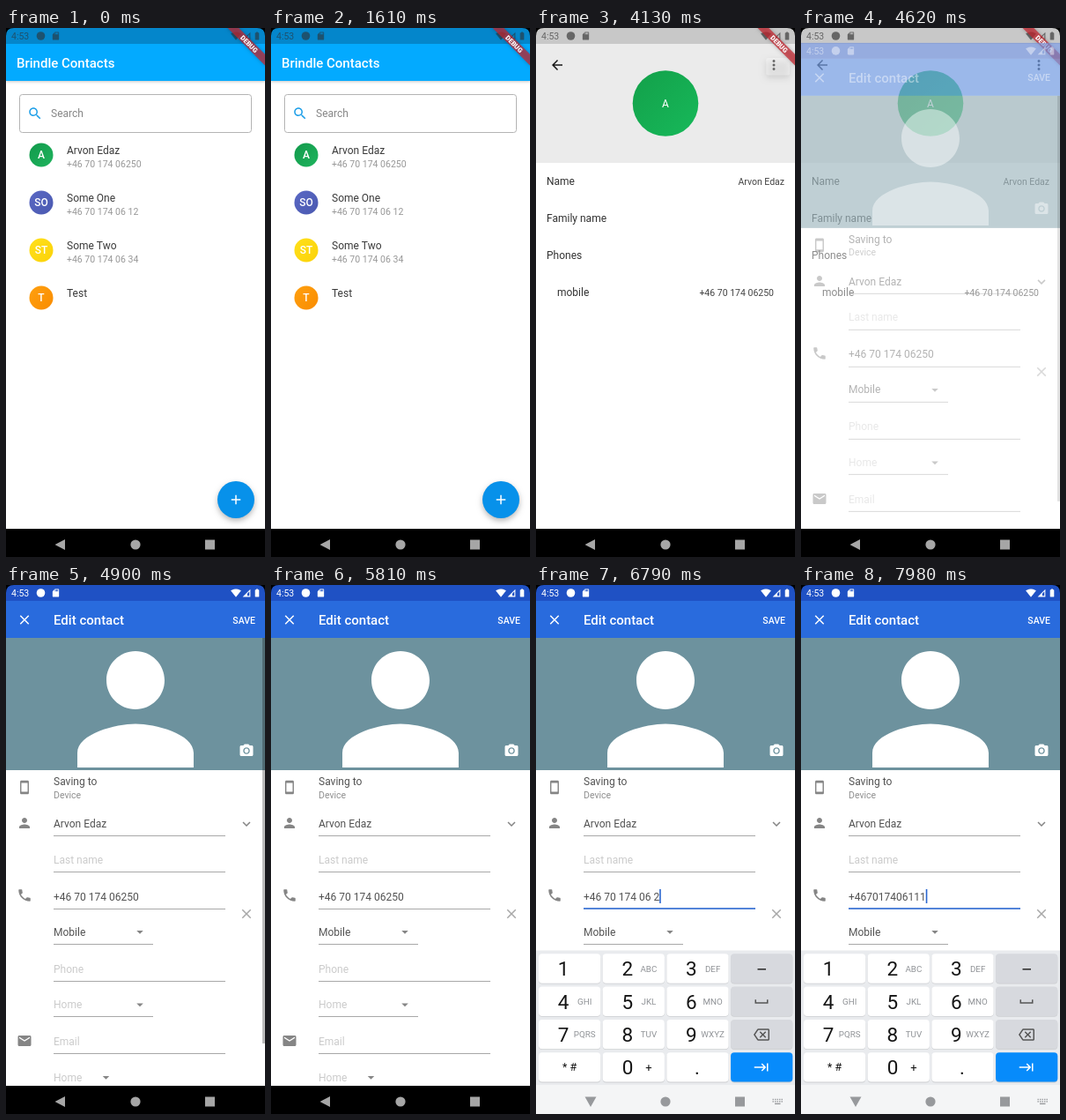
Recreate the animation shown at these times as an HTML page with a canvas. Size 294x600 px, loop 8 s.

```html
<!DOCTYPE html>
<html lang="en">
<head>
<meta charset="utf-8">
<title>Contacts</title>
<style>
html, body { margin: 0; width: 100%; height: 100%; overflow: hidden; background: #fff; }
canvas { display: block; width: 294px; height: 600px; }
</style>
</head>
<body>
<canvas id="stage"></canvas>
<script>
const W = 294, H = 600, LOOP = 8000, TICK = 70;
const canvas = document.getElementById('stage');
const ctx = canvas.getContext('2d');
const ratio = window.devicePixelRatio || 1;
canvas.width = W * ratio;
canvas.height = H * ratio;

const NAME = 'Arvon Edaz', PHONE = '+46 70 174 06250';
const CONTACTS = [
  { name: NAME, phone: PHONE, tag: 'A', from: '#12994b', to: '#1fb45e' },
  { name: 'Some One', phone: '+46 70 174 06 12', tag: 'SO', from: '#5a68c4', to: '#4a59b0' },
  { name: 'Some Two', phone: '+46 70 174 06 34', tag: 'ST', from: '#ffe01c', to: '#fbd208' },
  { name: 'Test', phone: '', tag: 'T', from: '#ffa010', to: '#f98c00' }
];

// Text in the phone field from each moment on
const TYPING = [
  [0, PHONE],
  [6650, '+46 70 174 06 25'],
  [6790, '+46 70 174 06 2'],
  [6930, '+46 70 174 06'],
  [7210, '+46 70 174 06 1'],
  [7420, '+46 70 174 06 11'],
  [7560, '+467017406111']
];
const DETAIL_AT = 1680, MENU_AT = 4095, MENU_TAP = 4480;
const EDIT_AT = 4560, FOCUS_AT = 5950, KEYS_AT = 6010;

const ICONS = {
  search: 'M15.5 14h-.79l-.28-.27C15.41 12.59 16 11.11 16 9.5 16 5.91 13.09 3 9.5 3S3 5.91 3 9.5 5.91 16 9.5 16c1.61 0 3.09-.59 4.23-1.57l.27.28v.79l5 4.99L20.49 19l-4.99-5zm-6 0C7.01 14 5 11.99 5 9.5S7.01 5 9.5 5 14 7.01 14 9.5 11.99 14 9.5 14z',
  add: 'M19 13h-6v6h-2v-6H5v-2h6V5h2v6h6v2z',
  back: 'M20 11H7.83l5.59-5.59L12 4l-8 8 8 8 1.41-1.41L7.83 13H20v-2z',
  close: 'M19 6.41L17.59 5 12 10.59 6.41 5 5 6.41 10.59 12 5 17.59 6.41 19 12 13.41 17.59 19 19 17.59 13.41 12z',
  more: 'M12 4a2 2 0 1 0 .01 0zM12 10a2 2 0 1 0 .01 0zM12 16a2 2 0 1 0 .01 0z',
  device: 'M17 1H7c-1.1 0-2 .9-2 2v18c0 1.1.9 2 2 2h10c1.1 0 2-.9 2-2V3c0-1.1-.9-2-2-2zM17 19H7V5h10v14z',
  person: 'M12 12c2.21 0 4-1.79 4-4s-1.79-4-4-4-4 1.79-4 4 1.79 4 4 4zm0 2c-2.67 0-8 1.34-8 4v2h16v-2c0-2.66-5.33-4-8-4z',
  phone: 'M6.62 10.79c1.44 2.83 3.76 5.14 6.59 6.59l2.2-2.2c.27-.27.67-.36 1.02-.24 1.12.37 2.33.57 3.57.57.55 0 1 .45 1 1V20c0 .55-.45 1-1 1-9.39 0-17-7.61-17-17 0-.55.45-1 1-1h3.5c.55 0 1 .45 1 1 0 1.25.2 2.45.57 3.57.11.35.03.74-.25 1.02l-2.2 2.2z',
  mail: 'M20 4H4c-1.1 0-2 .9-2 2v12c0 1.1.9 2 2 2h16c1.1 0 2-.9 2-2V6c0-1.1-.9-2-2-2zm0 4l-8 5-8-5V6l8 5 8-5v2z',
  camera: 'M9 2L7.17 4H4c-1.1 0-2 .9-2 2v12c0 1.1.9 2 2 2h16c1.1 0 2-.9 2-2V6c0-1.1-.9-2-2-2h-3.17L15 2H9zm3 15c-2.76 0-5-2.24-5-5s2.24-5 5-5 5 2.24 5 5-2.24 5-5 5zM12 8.8a3.2 3.2 0 1 0 .01 0z',
  expand: 'M16.59 8.59L12 13.17 7.41 8.59 6 10l6 6 6-6z',
  drop: 'M7 10l5 5 5-5z',
  erase: 'M22 3H7c-.69 0-1.23.35-1.59.88L0 12l5.41 8.11c.36.53.9.89 1.59.89h15c1.1 0 2-.9 2-2V5c0-1.1-.9-2-2-2zm0 16H7.07L2.4 12l4.66-7H22v14zm-11.59-2L14 13.41 17.59 17 19 15.59 15.41 12 19 8.41 17.59 7 14 10.59 10.41 7 9 8.41 12.59 12 9 15.59z',
  next: 'M11.59 7.41L15.17 11H1v2h14.17l-3.59 3.59L13 18l6-6-6-6-1.41 1.41zM20 6v12h2V6h-2z',
  space: 'M20 9v4H4V9H2v6h20V9z',
  card: 'M18 2h-8L4 8v12c0 1.1.9 2 2 2h12c1.1 0 2-.9 2-2V4c0-1.1-.9-2-2-2zm-6 6h-2V4h2v4zm3 0h-2V4h2v4zm3 0h-2V4h2v4z',
  wifi: 'M12 21.5L23.64 7c-.45-.34-4.93-4-11.64-4S.81 6.66.36 7z',
  signal: 'M22 2L2 22h20zM19.5 8v11.5H14V13.5z',
  battery: 'M15.67 4H14V2h-4v2H8.33C7.6 4 7 4.6 7 5.33v15.33C7 21.4 7.6 22 8.33 22h7.33c.74 0 1.34-.6 1.34-1.33V5.33C17 4.6 16.4 4 15.67 4z'
};
for (const key in ICONS) ICONS[key] = new Path2D(ICONS[key]);

const clamp = v => Math.max(0, Math.min(1, v));
const span = (t, from, length) => clamp((t - from) / length);
const easeOut = v => 1 - (1 - v) * (1 - v);

function rect(x, y, w, h, color) {
  ctx.fillStyle = color;
  ctx.fillRect(x, y, w, h);
}

function roundRect(x, y, w, h, r, color) {
  ctx.beginPath();
  ctx.roundRect(x, y, w, h, r);
  ctx.fillStyle = color;
  ctx.fill();
}

function disc(x, y, r, color) {
  ctx.beginPath();
  ctx.arc(x, y, r, 0, Math.PI * 2);
  ctx.fillStyle = color;
  ctx.fill();
}

function poly(color, ...points) {
  ctx.beginPath();
  points.forEach(([x, y]) => ctx.lineTo(x, y));
  ctx.fillStyle = color;
  ctx.fill();
}

function text(str, x, y, size, color, align = 'left', weight = 400) {
  ctx.font = `${weight} ${size}px Roboto, sans-serif`;
  ctx.textAlign = align;
  ctx.textBaseline = 'alphabetic';
  ctx.fillStyle = color;
  ctx.fillText(str, x, y);
}

function icon(name, x, y, color, size = 18) {
  ctx.save();
  ctx.translate(x - size / 2, y - size / 2);
  ctx.scale(size / 24, size / 24);
  ctx.fillStyle = color;
  ctx.fill(ICONS[name], 'evenodd');
  ctx.restore();
}

function shadow(color, blur, dy) {
  ctx.shadowColor = color;
  ctx.shadowBlur = blur * ratio;
  ctx.shadowOffsetY = dy * ratio;
}

function avatar(c, x, y, r) {
  const g = ctx.createLinearGradient(x - r, y - r, x + r, y + r);
  g.addColorStop(0, c.from);
  g.addColorStop(1, c.to);
  disc(x, y, r, g);
  text(c.tag, x, y + 4.3, 12, '#fff', 'center', r < 20 ? 500 : 400);
}

function statusBar(bg, fg) {
  rect(0, 0, W, 18, bg);
  text('4:53', 6, 13, 10.5, fg);
  disc(39.5, 9, 4.8, fg);
  icon('card', 56.5, 9, fg, 11);
  icon('wifi', 261, 9, fg, 12);
  icon('signal', 273, 9, fg, 10.5);
  icon('battery', 285, 9, fg, 11);
}

function debugBanner() {
  ctx.save();
  ctx.translate(W, 0);
  ctx.rotate(Math.PI / 4);
  shadow('rgba(0,0,0,.35)', 4, 0);
  rect(-30, 21, 60, 9, 'rgba(198,38,48,.72)');
  shadow('transparent', 0, 0);
  text('DEBUG', 0, 28.3, 7.6, '#fff', 'center', 900);
  ctx.restore();
}

function drawList() {
  rect(0, 0, W, 568, '#fff');
  ctx.save();
  shadow('rgba(0,0,0,.22)', 3, 1);
  rect(0, 18, W, 42, '#03aaff');
  ctx.restore();
  statusBar('#0486cb', 'rgba(45,50,55,.62)');
  text('Brindle Contacts', 12, 45, 15, '#fff', 'left', 500);

  ctx.beginPath();
  ctx.roundRect(15.5, 75.5, 263, 43, 3);
  ctx.strokeStyle = '#b4b4b4';
  ctx.lineWidth = 1;
  ctx.stroke();
  icon('search', 33, 97, '#1e9fe8');
  text('Search', 51, 101, 12, '#868686');

  CONTACTS.forEach((c, i) => {
    const y = 144 + 54 * i;
    avatar(c, 40, y, 13.5);
    text(c.name, 69, y - 1, 12, '#3a3a3a');
    text(c.phone, 69, y + 14, 10.5, '#979797');
  });

  ctx.save();
  shadow('rgba(0,0,0,.28)', 6, 3);
  disc(261, 535, 21, '#0791ea');
  ctx.restore();
  icon('add', 261, 535, '#fff');
  debugBanner();
}

function drawMenu(t) {
  const alpha = span(t, MENU_AT, 100) * (1 - span(t, MENU_TAP, 100));
  if (!alpha) return;
  const w = 84 * span(t, MENU_AT, 110), h = 84 * span(t, MENU_AT, 150);
  const x = 288 - w, y = 34;
  ctx.save();
  ctx.globalAlpha = alpha;
  shadow('rgba(0,0,0,.35)', 7, 3);
  roundRect(x, y, w, h, 2, '#fff');
  shadow('transparent', 0, 0);
  ctx.beginPath();
  ctx.rect(x, y, w, h);
  ctx.clip();
  ['Edit', 'Delete'].forEach((label, i) => {
    ctx.globalAlpha = alpha * span(t, MENU_AT + 85 * (i + 1), 130);
    text(label, 216, y + 28 + 36 * i, 12, '#222');
  });
  ctx.restore();
}

function drawDetail(t) {
  rect(0, 0, W, 568, '#fff');
  rect(0, 18, W, 135, '#ebebeb');
  statusBar('#c8c8c8', '#666');
  icon('back', 24, 42, '#181818');
  icon('more', 270, 42, '#181818');
  avatar({ tag: 'A', from: '#13a04a', to: '#17b95a' }, 147, 85.5, 37.3);
  const ink = '#333', value = '#444';
  text('Name', 12, 178, 12, ink);
  text(NAME, 282, 177.5, 10.5, value, 'right');
  text('Family name', 12, 220, 12, ink);
  text('Phones', 12, 262, 12, ink);
  text('mobile', 24, 304, 12, ink);
  text(PHONE, 270, 303.5, 10.5, value, 'right');
  drawMenu(t);
  debugBanner();
}

function field(str, y, right, color) {
  text(str, 54, y, 12, color);
  rect(54, Math.round(y + 9.4), right - 54, 1, '#a8a8a8');
}

function phoneField(t) {
  const [typedAt, value] = TYPING.filter(([at]) => t >= at).pop();
  const y = 357.5, ink = '#525252', blue = '#2a66d0';
  if (t < FOCUS_AT) {
    field(value, y, 249, ink);
    return;
  }
  text(value, 54, y, 12, ink);
  rect(54, 366.2, 195, 1.6, blue);
  const x = 54 + ctx.measureText(value).width;
  const since = t - Math.max(FOCUS_AT, typedAt);
  if (since % 1000 < 500) rect(x, 345, 1.6, 16, blue);
  if (t < TYPING[1][0]) {
    disc(x + .5, 371, 7.2, blue);
    poly(blue, [x + .5, 361.5], [x + 6, 367], [x - 5, 367]);
  }
}

function scrollbar(t) {
  const typing = t >= FOCUS_AT;
  ctx.save();
  ctx.globalAlpha *= 1 - (typing ? span(t, 6230, 250) : span(t, 4900, 140));
  rect(291, 60, 3, typing ? 224 : 460, 'rgba(0,0,0,.27)');
  ctx.restore();
}

function drawEdit(t) {
  rect(0, 0, W, 568, '#fff');
  rect(0, 18, W, 42, '#296bdd');
  statusBar('#1f51c4', '#fff');
  icon('close', 21, 39.5, '#fff');
  text('Edit contact', 54, 45, 15, '#fff', 'left', 500);
  text('SAVE', 283, 43.5, 10.5, '#fff', 'right', 500);
  rect(0, 60, W, 150, '#6d929e');
  icon('person', 147, 141, '#fff', 198);
  icon('camera', 273, 188, '#fff');

  const ink = '#525252', hint = '#cbcbcb', grey = '#858585';
  icon('device', 21, 229.5, grey, 17);
  text('Saving to', 54, 227, 12, ink);
  text('Device', 54, 241.5, 10.5, '#909090');
  icon('person', 21, 270, grey);
  field(NAME, 275, 249, ink);
  icon('expand', 273, 271, grey);
  field('Last name', 315.5, 249, hint);
  icon('phone', 21, 352, grey);
  phoneField(t);
  icon('close', 273, 373, '#a8a8a8');
  field('Mobile', 397.5, 167, ink);
  icon('drop', 152, 393.5, grey);
  field('Phone', 439.5, 249, hint);
  field('Home', 480, 167, hint);
  icon('drop', 152, 476, grey);
  icon('mail', 21, 517, grey);
  field('Email', 522, 249, hint);
  field('Home', 562.5, 128, hint);
  icon('drop', 113.5, 558.5, grey);
  scrollbar(t);
}

function drawNav() {
  rect(0, 568, W, 32, '#000');
  const c = '#a6a6a6';
  poly(c, [55.5, 586], [67, 580], [67, 592]);
  disc(147, 586, 5.6, c);
  rect(226, 580.5, 11, 11, c);
}

function drawKeyboard(t) {
  const alpha = span(t, KEYS_AT, 75);
  if (!alpha) return;
  const drop = 21.5 * (1 - easeOut(span(t, KEYS_AT, 400)));
  ctx.save();
  ctx.globalAlpha = alpha;
  ctx.translate(0, drop);
  rect(0, 414.5, W, 186, '#e9ebee');
  rect(0, 567, W, 33, '#f4f5f6');

  const letters = ['', 'ABC', 'DEF', 'GHI', 'JKL', 'MNO', 'PQRS', 'TUV', 'WXYZ'];
  for (let row = 0; row < 4; row++) {
    const y = 418.3 + 37.3 * row, mid = y + 16.9;
    for (let col = 0; col < 4; col++) {
      const x = 3 + 72.7 * col;
      const fill = col < 3 ? '#fff' : row < 3 ? '#d7d9de' : '#078bfb';
      roundRect(x, y + .8, 70.2, 33.4, 4, 'rgba(0,0,0,.13)');
      roundRect(x, y, 70.2, 33.4, 4, fill);
      if (row < 3 && col < 3) {
        const n = row * 3 + col, cx = 31 + 72.7 * col;
        text(n + 1, cx, mid + 8.2, 22.5, '#151515', 'center');
        text(letters[n], cx + 24.2, mid + 3.5, 9.8, '#8f9296', 'center');
      }
    }
  }
  text('* #', 38, 551.3, 12.5, '#151515', 'center');
  text('0', 104, 555.3, 22.5, '#151515', 'center');
  text('+', 128, 551.8, 13, '#151515', 'center');
  text('.', 183, 555.3, 22, '#151515', 'center');
  rect(251.5, 435, 9.5, 1.6, '#333');
  icon('space', 256, 472.5, '#555');
  icon('erase', 256, 510, '#555');
  icon('next', 256, 547, '#fff');
  ctx.restore();

  ctx.save();
  ctx.globalAlpha = alpha;
  const c = '#97999c';
  poly(c, [55.5, 580.5], [68.5, 580.5], [62, 592]);
  disc(147, 586, 5.6, c);
  rect(226, 580.5, 11, 11, c);
  for (let i = 0; i < 10; i++) {
    rect(268.5 + 2.5 * (i % 5), 582.8 + 2.4 * Math.floor(i / 5), 1.4, 1.4, c);
  }
  rect(271, 587.7, 6.5, 1.4, c);
  ctx.restore();
}

function corners() {
  const r = 9;
  [[0, 1], [W, -1]].forEach(([x, s]) => {
    ctx.beginPath();
    ctx.moveTo(x, 0);
    ctx.lineTo(x + s * r, 0);
    ctx.quadraticCurveTo(x, 0, x, r);
    ctx.fillStyle = '#000';
    ctx.fill();
  });
}

function draw(t) {
  ctx.setTransform(ratio, 0, 0, ratio, 0, 0);
  if (t < DETAIL_AT) drawList();
  else if (t < EDIT_AT + 240) drawDetail(t);
  if (t >= EDIT_AT) {
    const p = easeOut(span(t, EDIT_AT, 240));
    ctx.save();
    ctx.globalAlpha = p;
    ctx.translate(0, 30 * (1 - p));
    drawEdit(t);
    ctx.restore();
  }
  drawNav();
  drawKeyboard(t);
  corners();
}

const start = performance.now();
function frame() {
  const t = (performance.now() - start) % LOOP;
  draw(Math.floor(t / TICK) * TICK);
  requestAnimationFrame(frame);
}
frame();
</script>
</body>
</html>
```
